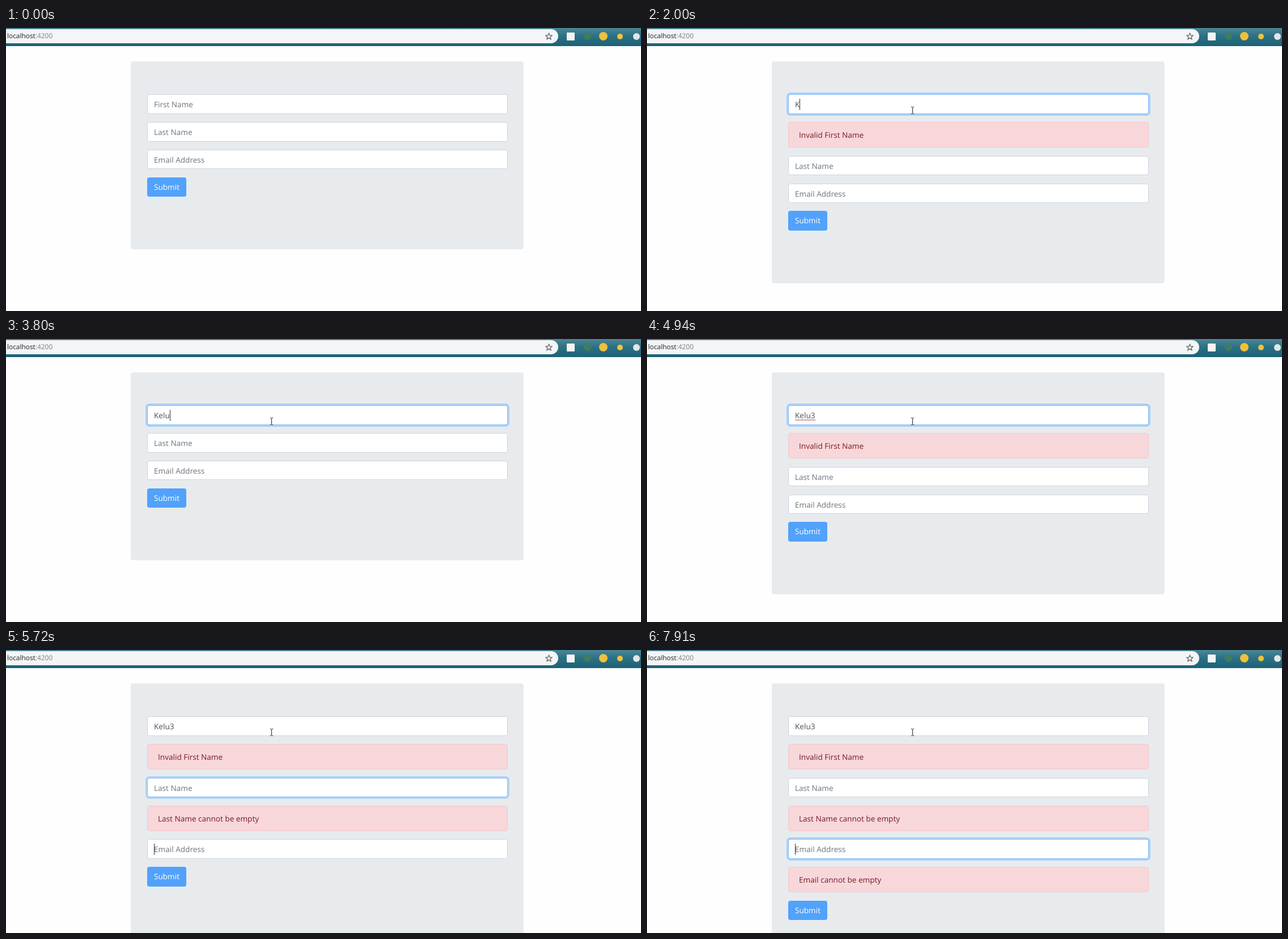
An HTML page for the animation above (8 s loop, 1120 by 500 pixels).

```html
<!DOCTYPE html>
<html lang="en">
<head>
<meta charset="utf-8">
<title>Form validation</title>
<style>
  html, body { margin: 0; width: 100%; height: 100%; overflow: hidden; background: #fefefe; }
  #stage {
    position: relative; width: 1120px; height: 500px; overflow: hidden; background: #fefefe;
    font: 13.6px/34.5px "Open Sans", "Noto Sans", sans-serif; text-rendering: geometricPrecision;
    white-space: nowrap;
  }
  #stage * { box-sizing: border-box; }
  [hidden] { display: none !important; }

  .bar { position: absolute; inset: 0 0 auto; height: 32px; background: linear-gradient(#4d8696, #2b7184 45%, #1c6176); }
  .url {
    position: absolute; left: -30px; top: 2px; width: 1004px; height: 25px; border-radius: 13px;
    background: #f3f5f6; padding-left: 32px; font-size: 11.9px; line-height: 24px; color: #202124;
  }
  .url span { color: #7b7f83; }
  .bar svg { position: absolute; left: 951px; top: 8px; }
  .icon { position: absolute; border-radius: 50%; }
  #urlCaret { position: absolute; left: 0; top: 9px; width: 1px; height: 12px; background: #222; }

  .panel {
    position: absolute; left: 220px; top: 59px; width: 693px; padding: 58.2px 28px 93px 29px;
    border-radius: 4.5px; background: #e8ebee;
  }
  .field {
    --g: 0;
    position: relative; height: 34.5px; margin-bottom: 14.4px; padding-left: 11px; line-height: 33.5px;
    border: 1px solid color-mix(in srgb, #80bdff calc(var(--g) * 100%), #ced4da);
    border-radius: 4px; background: #fff; color: #495057;
    box-shadow: 0 0 0 3px rgba(0, 123, 255, calc(.25 * var(--g)));
  }
  .hint { color: #6c757d; }
  .caret { position: absolute; top: 7px; width: 1px; height: 20px; background: #333; }
  .field svg { position: absolute; left: 11px; top: 23px; }
  .error {
    height: 45.2px; margin-bottom: 14.4px; padding-left: 18px; line-height: 43.5px;
    border: 1px solid #f5c6cb; border-radius: 4px; background: #f8d7da; color: #721c24;
  }
  .submit { width: 69px; height: 34.5px; border-radius: 4px; background: #52a2fb; color: #fff; text-align: center; }
  #list {
    position: absolute; left: 249px; top: 151px; width: 65px; height: 210px; padding: 7px 0 0 11px;
    border-radius: 0 0 4px 4px; background: #fff; box-shadow: 0 1px 3px rgba(0, 0, 0, .4);
    font-size: 11px; line-height: 32.5px; color: #222;
  }
  #mouse { position: absolute; left: 0; top: 0; }
</style>
</head>
<body>
<div id="stage">
  <div class="bar">
    <div class="url">localhost<span>:4200</span></div>
    <i id="urlCaret"></i>
    <svg width="13" height="13" viewBox="0 0 13 13" fill="none" stroke="#5f6368" stroke-width="1.3">
      <path d="M6.5 1.2 8.1 4.9 12.1 5.2 9 7.8 10 11.8 6.5 9.6 3 11.8 4 7.8 .9 5.2 4.9 4.9Z"/>
    </svg>
  </div>
  <div class="panel" id="panel"></div>
  <div id="list"></div>
  <svg id="mouse" width="5" height="13" stroke="#222" shape-rendering="crispEdges">
    <path d="M0 .5h2M3 .5h2M2.5 1v11M0 12.5h2M3 12.5h2"/>
  </svg>
</div>
<script>
const LOOP = 8000;
const $ = id => document.getElementById(id);

function add(parent, tag, cls, text = "") {
  const el = document.createElement(tag);
  el.className = cls;
  el.textContent = text;
  parent.append(el);
  return el;
}

// Toolbar buttons: x, y, size, colour
[[996, 15, 14, "#f4f4f2"], [1025, 14.5, 13, "#3f7d62"], [1053.5, 14.5, 15, "#f2bf3a"],
 [1082.5, 14.5, 10, "#f0c23c"], [1111.5, 14.5, 12, "#e3e6e8"]].forEach(([x, y, size, color], i) => {
  const el = add(document.querySelector(".bar"), "i", "icon");
  Object.assign(el.style, {
    left: x - size / 2 + "px", top: y - size / 2 + "px",
    width: size + "px", height: size + "px", background: color
  });
  if (!i) el.style.borderRadius = "1px";
});

const fields = [
  ["First Name", "Invalid First Name"],
  ["Last Name", "Last Name cannot be empty"],
  ["Email Address", "Email cannot be empty"]
].map(([hint, message]) => {
  const box = add($("panel"), "div", "field");
  return {
    box,
    value: add(box, "span", ""),
    caret: add(box, "i", "caret"),
    hint: add(box, "span", "hint", hint),
    error: add($("panel"), "div", "error", message)
  };
});
add($("panel"), "div", "submit", "Submit");

const first = fields[0];
first.box.insertAdjacentHTML("beforeend",
  `<svg width="36" height="4" fill="none" stroke="#e0464c"><path d="M0 3${"l1.5-2 1.5 2".repeat(12)}"/></svg>`);
const squiggle = first.box.querySelector("svg");

for (const word of ["tmun", "gj", "Fuvo", "zoku", "Xolpu", "obsk"]) add($("list"), "div", "", word);

// caret: field index, "url" or null; glow: focus ring per field; errors: how many are shown
const start = { mouse: null, caret: null, glow: [0, 0, 0], errors: 0, text: "", list: false, spell: false };
const steps = [
  [220, { mouse: [690, 235] }],
  [300, { mouse: [562, 114] }],
  [530, { mouse: [525, 125] }],
  [610, { mouse: [484, 136] }],
  [680, { mouse: [466, 139] }],
  [1140, { caret: 0, glow: [.1, 0, 0] }],
  [1230, { glow: [.7, 0, 0] }],
  [1310, { glow: [1, 0, 0] }],
  [1400, { list: true }],
  [1690, { caret: null }],
  [2000, { caret: 0, list: false, text: "K", errors: 1 }],
  [2380, { text: "Ke", errors: 0 }],
  [2610, { text: "Kel" }],
  [2690, { text: "Kelu" }],
  [3240, { caret: null }],
  [3800, { caret: 0 }],
  [3940, { text: "Kelu3", errors: 1 }],
  [4480, { caret: null }],
  [4940, { spell: true }],
  [5020, { spell: false, caret: 1 }],
  [5100, { glow: [.5, .5, 0] }],
  [5180, { glow: [.1, .9, 0] }],
  [5260, { glow: [0, 1, 0] }],
  [5640, { caret: null }],
  [5720, { caret: 2, errors: 2, glow: [0, .9, 0] }],
  [5800, { glow: [0, .35, .65] }],
  [5880, { glow: [0, 0, 1] }],
  [6280, { caret: null }],
  [6740, { caret: 2 }],
  [6970, { caret: "url", errors: 3 }],
  [7050, { glow: [0, 0, .4] }],
  [7120, { glow: [0, 0, 0] }],
  [7750, { caret: 2 }],
  [7830, { glow: [0, 0, .6] }],
  [7910, { glow: [0, 0, 1] }]
];

function show(el, on) { el.toggleAttribute("hidden", !on); }

function render(s) {
  fields.forEach((f, i) => {
    f.box.style.setProperty("--g", s.glow[i]);
    show(f.caret, s.caret === i);
    show(f.error, i < s.errors);
  });
  first.value.textContent = s.text;
  show(first.hint, !s.text);
  show(squiggle, s.spell);
  show($("urlCaret"), s.caret === "url");
  show($("list"), s.list);
  show($("mouse"), s.mouse);
  if (s.mouse) $("mouse").style.transform = `translate(${s.mouse[0]}px, ${s.mouse[1]}px)`;
}

const origin = performance.now();
let shown = -1;

function tick() {
  const t = (performance.now() - origin) % LOOP;
  const past = steps.filter(([at]) => at <= t);
  if (past.length !== shown) {
    shown = past.length;
    render(Object.assign({}, start, ...past.map(([, change]) => change)));
  }
  requestAnimationFrame(tick);
}
tick();
</script>
</body>
</html>
```
